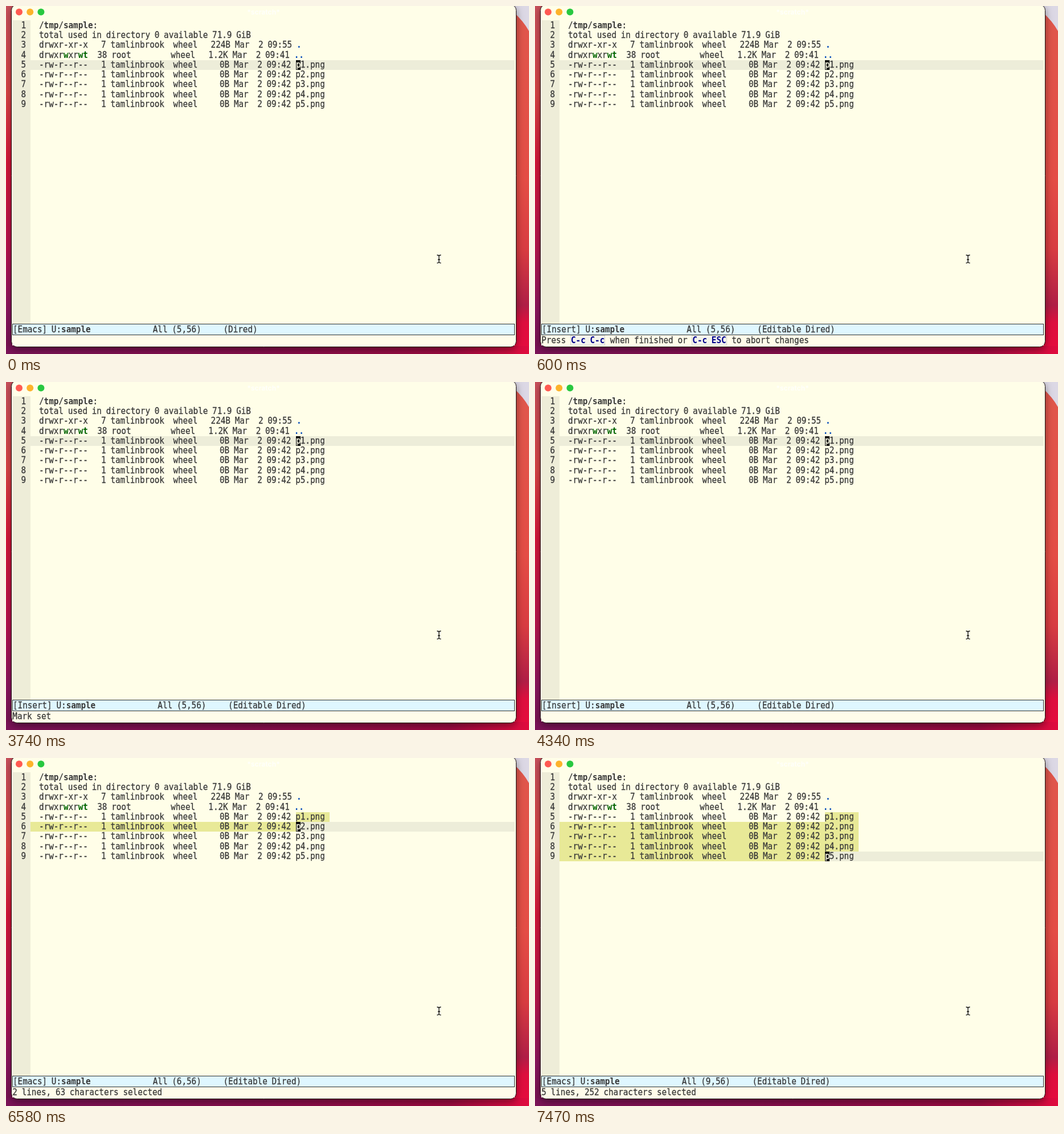
An HTML page with a canvas for the animation above (8 s loop, 918x610 px).

```html
<!DOCTYPE html>
<html lang="en">
<head>
<meta charset="utf-8">
<title>Editable Dired</title>
<style>
  html, body { margin: 0; width: 100%; height: 100%; overflow: hidden; }
  canvas { display: block; }
</style>
</head>
<body>
<canvas id="stage" width="918" height="610"></canvas>
<script>
const ctx = document.getElementById('stage').getContext('2d');
const LOOP = 8000;
const CHAR = 8.6, ROW = 17.25, TOP = 26, LEFT = 11.3, RIGHT = 893;
const GUTTER_END = 43, LISTING_X = 58, NAME_X = 509, REGION_END = 568;
const PAPER = '#fffee8', INK = '#383838', GUTTER = '#eeedd8', CURRENT = '#ededd9',
      REGION = '#e8e997', BAR = '#dff7ff', BLUE = '#0048b8', NAVY = '#00008b', GREEN = '#006400';

const USER = 'tamlinbrook';
const plain = text => [[text]];
const listing = [
  [['/tmp/sample', INK, true], [':']],
  plain('total used in directory 0 available 71.9 GiB'),
  [[`drwxr-xr-x   7 ${USER}  wheel   224B Mar  2 09:55 `], ['.', BLUE, true]],
  [['drwxr'], ['w', GREEN, true], ['xr'], ['wt', GREEN, true],
   ['  38 root         wheel   1.2K Mar  2 09:41 '], ['..', BLUE, true]],
  ...[1, 2, 3, 4, 5].map(n =>
    plain(`-rw-r--r--   1 ${USER}  wheel     0B Mar  2 09:42 p${n}.png`)),
];

const commands = `set-mark-command (C-SPC)
tamlin/hugo2md-gitea
query-replace (M-%)
org-toggle-inline-images
tamlin/hugo2md-github
eval-buffer
yas-minor-mode
counsel-load-theme
sis-get
org-time-stamp
try
run-geiser
org-delete-property-globally
ediff (ediff-files)
org-display-inline-images
racket-mode
flyspell-mode
package-refresh-contents
org-babel-execute-src-block
sis-global-cursor-color-mode
org-agenda
global-writeroom-mode
package-list-packages (list-packages)
show-paren-mode`.split('\n');

const KEY_HINT = [['Press '], ['C-c C-c', NAVY, true, true], [' when finished or '],
  ['C-c ESC', NAVY, true, true], [' to abort changes']];
const INSERT = { mode: 'Insert', major: 'Editable Dired', line: 5 };
const NORMAL = { ...INSERT, mode: 'Emacs' };
const selected = line => ({ ...NORMAL, line, region: true,
  message: plain(`${line - 4} lines, ${(line - 5) * 63} characters selected`) });

const timeline = [
  [0, { ...NORMAL, major: 'Dired' }],
  [450, { ...NORMAL, major: 'Dired', message: plain('C-x-') }],
  [600, { ...INSERT, message: KEY_HINT }],
  [3140, { ...INSERT, palette: true }],
  [3740, { ...INSERT, message: plain('Mark set') }],
  [4340, INSERT],
  [6280, NORMAL],
  [6580, selected(6)],
  [6880, selected(7)],
  [7030, selected(8)],
  [7470, selected(9)],
];

const rowTop = row => TOP + ROW * (row - 1);

function rect(x, y, right, bottom, color) {
  ctx.fillStyle = color;
  ctx.fillRect(x, y, right - x, bottom - y);
}

function frame(x, y, right, bottom, color) {
  ctx.strokeStyle = color;
  ctx.lineWidth = 1;
  ctx.strokeRect(x + .5, y + .5, right - x - 1, bottom - y - 1);
}

// Draws [text, color, bold, boxed] parts on one baseline; the face is tall and narrow.
function write(x, baseline, parts) {
  for (const [text, color = INK, bold, boxed] of parts) {
    ctx.font = `${bold ? 'bold ' : ''}14.285px "DejaVu Sans Mono", monospace`;
    ctx.wordSpacing = '-0.85px';
    const width = ctx.measureText(text).width;
    if (boxed) {
      const left = Math.round(x), right = Math.round(x + width + 2), y = Math.round(baseline);
      rect(left, y - 14, right, y + 4, '#f4f4ec');
      frame(left, y - 14, right, y + 4, '#d3d3cd');
      x += 1;
    }
    ctx.save();
    ctx.translate(x, baseline);
    ctx.scale(1, 1.14);
    ctx.fillStyle = ctx.strokeStyle = color;
    ctx.lineWidth = .25;
    ctx.fillText(text, 0, 0);
    if (!bold) ctx.strokeText(text, 0, 0);
    ctx.restore();
    x += width + (boxed ? 1 : 0);
  }
  return x;
}

const writeRow = (x, row, parts) => write(x, rowTop(row) + 12.8, parts);

function gradient(x, y, x2, y2, stops) {
  const fill = ctx.createLinearGradient(x, y, x2, y2);
  stops.forEach(([at, color]) => fill.addColorStop(at, color));
  return fill;
}

function drawDesktop() {
  rect(0, 0, 460, 610, gradient(0, 0, 0, 610, [[0, '#c9505c'], [.25, '#dc4446'],
    [.45, '#d8163a'], [.7, '#b8144e'], [.88, '#8c1560'], [1, '#75114f']]));
  rect(460, 0, 918, 610, gradient(0, 0, 0, 610, [[0, '#e0574c'], [.5, '#e44d45'],
    [.7, '#d83c41'], [.86, '#b01e46'], [.91, '#de0e3d'], [1, '#e60b3e']]));
  rect(0, 596, 918, 610, gradient(0, 0, 918, 0, [[0, '#7a1257'], [.5, '#870d4b'],
    [.85, '#9c0a40'], [1, '#e00b3e']]));
  ctx.fillStyle = '#dcd8e5';
  ctx.beginPath();
  ctx.moveTo(890, 0);
  ctx.lineTo(918, 0);
  ctx.lineTo(918, 44);
  ctx.quadraticCurveTo(908, 26, 890, 10);
  ctx.fill();
}

function drawWindow() {
  ctx.save();
  ctx.shadowColor = 'rgba(0,0,0,.45)';
  ctx.shadowBlur = 14;
  ctx.shadowOffsetY = 4;
  ctx.fillStyle = PAPER;
  ctx.beginPath();
  ctx.roundRect(9.5, -2.5, 886, 600, 10);
  ctx.fill();
  ctx.restore();
  ctx.strokeStyle = '#1c1013';
  ctx.lineWidth = 1;
  ctx.stroke();
  ['#ff5a52', '#fdb32b', '#28c840'].forEach((color, i) => {
    ctx.fillStyle = color;
    ctx.beginPath();
    ctx.arc(23 + 19.2 * i, 10.5, 6, 0, 2 * Math.PI);
    ctx.fill();
  });
  ctx.font = 'bold 12px Inter, sans-serif';
  ctx.textAlign = 'center';
  ctx.fillStyle = '#fffffa';
  ctx.fillText('*scratch*', 452, 14.5);
  ctx.textAlign = 'left';
}

function drawListing({ line, region, palette }) {
  const bottom = palette ? 143 : 557;
  ctx.save();
  ctx.beginPath();
  ctx.rect(11, 25, RIGHT - 11, bottom - 25);
  ctx.clip();
  rect(12, 25, GUTTER_END, bottom, GUTTER);
  const band = (row, x, right, color) =>
    rect(x, Math.floor(rowTop(row)), right, Math.floor(rowTop(row + 1)), color);
  band(line, GUTTER_END, RIGHT, CURRENT);
  if (region) {
    for (let row = 5; row <= line; row++)
      band(row, row === 5 ? NAME_X : GUTTER_END, row === line ? NAME_X : REGION_END, REGION);
  }
  if (!palette) band(line, NAME_X, NAME_X + 8, '#000');
  listing.forEach((parts, i) => {
    writeRow(26.5, i + 1, plain(String(i + 1)));
    writeRow(LISTING_X, i + 1, parts);
  });
  if (palette) frame(NAME_X, 95, NAME_X + 9, 112, '#000');
  else writeRow(NAME_X, line, [['p', PAPER]]);
  ctx.restore();
}

function drawModeLine({ mode, major, line, palette }) {
  const y = palette ? 143 : 557;
  rect(11, y, RIGHT, y + 20, BAR);
  frame(11, y, RIGHT, y + 20, '#2c3033');
  write(LEFT + .7, y + 15, [[`[${mode}] U:`], ['sample', INK, true],
    [`${' '.repeat(14)}${palette ? 'Top' : 'All'} (${line},56)     (${major})`]]);
}

function drawPalette() {
  const end = writeRow(LEFT, 9, plain('   1/9846 M-x '));
  rect(Math.floor(end), 164, Math.floor(end + CHAR - .5), 181, '#000');
  rect(11, 181, 217, 198, BAR);
  commands.forEach((command, i) => {
    const key = command.match(/^(.*\()([CM]-.+)(\))$/);
    writeRow(LEFT, 10 + i, key ? [[key[1]], [key[2], BLUE, true], [key[3]]] : plain(command));
  });
  rect(11, 196, 217, 197, INK);
}

function drawPointer() {
  const ibeam = new Path2D('M756.5 436.5 Q760 436.5 760 439 V448 Q760 450.5 756.5 450.5 ' +
    'M763.5 436.5 Q760 436.5 760 439 M760 448 Q760 450.5 763.5 450.5 M758 444.5 H762');
  ctx.strokeStyle = '#111';
  ctx.lineWidth = 1.3;
  ctx.stroke(ibeam);
}

function draw(now) {
  const time = now % LOOP;
  const state = timeline.findLast(([start]) => start <= time)[1];
  drawDesktop();
  drawWindow();
  drawListing(state);
  drawModeLine(state);
  if (state.palette) drawPalette();
  else rect(11, 577, RIGHT, 595, '#fffcea');
  if (state.message) writeRow(LEFT, 33, state.message);
  drawPointer();
}

const begin = performance.now();
function tick() {
  draw(performance.now() - begin);
  requestAnimationFrame(tick);
}
tick();
</script>
</body>
</html>
```
